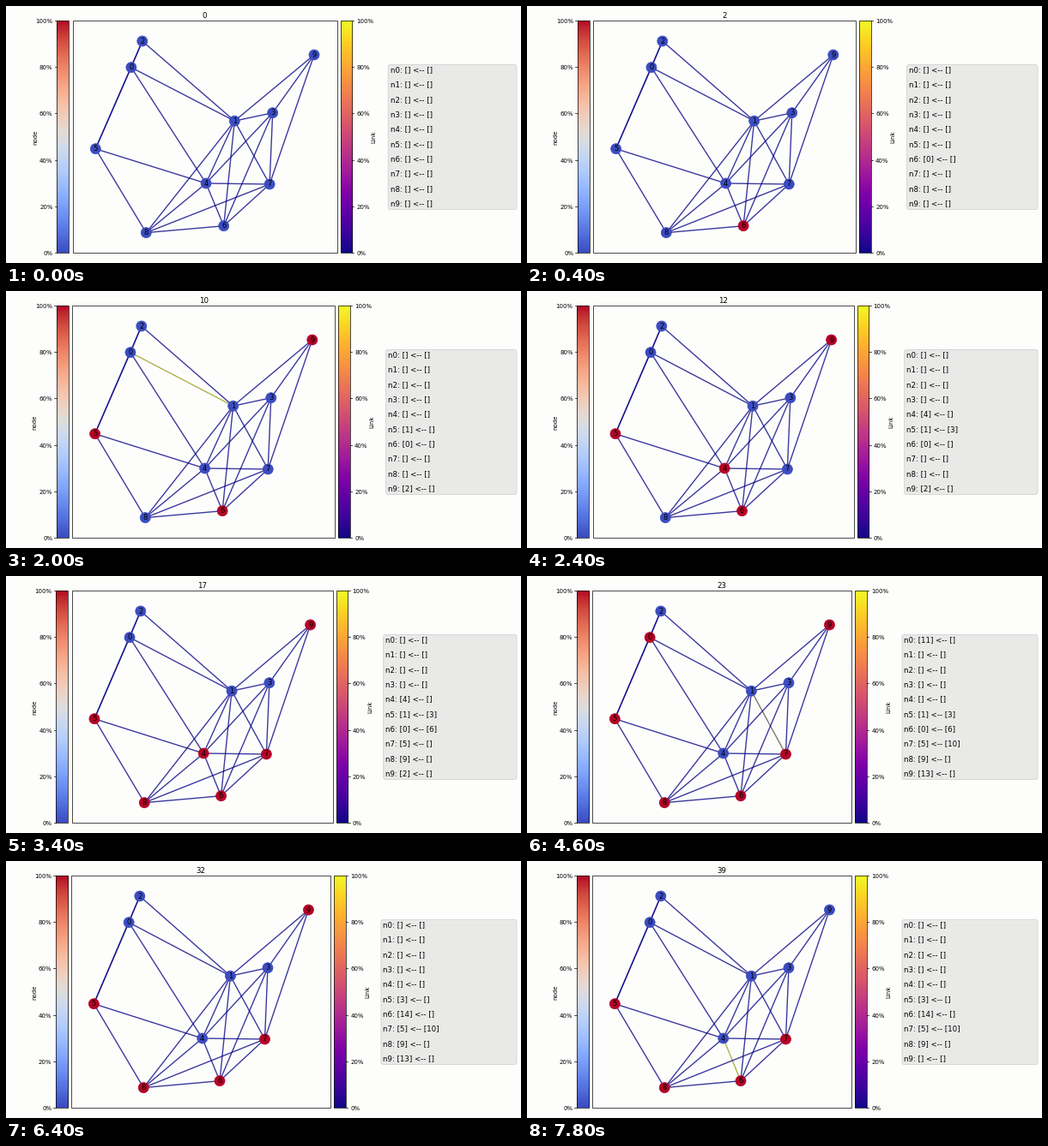
These frames come from a looping animation (600 px wide and 300 px high, 8000 ms). A matplotlib script:

```python
from itertools import combinations

import numpy as np
import matplotlib.pyplot as plt
from matplotlib.animation import FuncAnimation
from matplotlib.patches import FancyBboxPatch, Rectangle

W, H, DPI = 600, 300, 50
FRAMES, STEP_MS = 40, 200
TOP, BOTTOM = 17, 288
PAPER = "#fdfefc"

# node centres: x as a share of the plot width, y in pixels
NODES = np.array([(.222, 71.7), (.613, 134.2), (.264, 41), (.757, 124.7),
                  (.505, 207), (.087, 166.7), (.572, 256.7), (.7455, 208),
                  (.2785, 264.6), (.914, 57)])
# any two nodes within radio range are linked
RANGE, SPREAD = 177, (340, 1)
LINKS = [(a, b) for a, b in combinations(range(len(NODES)), 2)
         if np.hypot(*((NODES[a] - NODES[b]) * SPREAD)) < RANGE]

LONG = 30
# (task id, node, steps of work)
TASKS = [(0, 6, 24), (1, 5, 21), (2, 9, 13), (3, 5, LONG), (4, 4, 8),
         (5, 7, LONG), (6, 6, 3), (9, 8, LONG), (10, 7, LONG), (11, 0, 5),
         (13, 9, 10), (14, 6, LONG)]

# step -> link in use and its load
TRAFFIC = {10: ((0, 1), .69), 14: ((0, 4), .69), 23: ((1, 7), .4),
           38: ((6, 7), .69), 39: ((4, 6), .69)}

PLASMA, COOLWARM = plt.get_cmap("plasma"), plt.get_cmap("coolwarm")
RAMP = np.linspace(0, 1, 256)[:, None]

fig = plt.figure(figsize=(W / DPI, H / DPI), dpi=DPI, facecolor=PAPER)
stage = fig.add_axes([0, 0, 1, 1])


def arrival(task):
    """Step at which a task reaches its node."""
    return round(np.interp(task, [0, 3, 9, 14], [2, 11, 17, 25]))


def node_state(step):
    """Running and waiting task ids of every node, first come first served."""
    running = [[] for _ in NODES]
    waiting = [[] for _ in NODES]
    free_at = [0] * len(NODES)
    for task, node, work in TASKS:
        start = max(arrival(task), free_at[node])
        free_at[node] = start + work
        if start <= step < free_at[node]:
            running[node].append(task)
        elif arrival(task) <= step < start:
            waiting[node].append(task)
    return running, waiting


def outline(x, width):
    stage.add_patch(Rectangle((x, TOP), width, BOTTOM - TOP, fill=False,
                              ec="black", lw=1, zorder=5))


def color_scale(x, width, cmap, label, side):
    """Colour bar with ticks on its left (-1) or right (1) side."""
    stage.imshow(RAMP, cmap=cmap, origin="lower", aspect="auto",
                 extent=(x, x + width, BOTTOM, TOP), interpolation="nearest")
    outline(x, width)
    edge = x + width if side > 0 else x
    align = "left" if side > 0 else "right"
    for y, share in zip(np.linspace(BOTTOM, TOP, 6), range(0, 101, 20)):
        stage.plot([edge, edge + 2.4 * side], [y, y], color="black", lw=1)
        stage.text(edge + 0.5 + 4.9 * side, y + 0.5, f"{share}%", fontsize=10,
                   ha=align, va="center_baseline")
    stage.text(edge + 0.5 + 25.2 * side, (TOP + BOTTOM + 1) / 2, label,
               fontsize=10, rotation=90, ha="center", va="center")


def draw_graph(left, width, step, running):
    xy = NODES * (width, 1) + (left, 0)
    active, load = TRAFFIC.get(step, (None, 0))
    idle, busy = np.array(PLASMA([0.0, 1.0]))
    idle[3] = 0.8
    for link in LINKS:
        color = idle + (busy - idle) * load if link == active else idle
        stage.plot(*xy[list(link)].T, color=tuple(color), lw=2, zorder=2)
    use = [float(bool(tasks)) for tasks in running]
    stage.scatter(*xy.T, s=300, c=COOLWARM(use), linewidths=1, zorder=6)
    for i, (x, y) in enumerate(xy):
        stage.text(x, y, str(i), fontsize=12, ha="center", va="center",
                   zorder=7)


def draw_panel(x, lines):
    stage.add_patch(FancyBboxPatch(
        (x, 68.5), 595 - x, 169, boxstyle="round,pad=0,rounding_size=2.5",
        fc="#e9e9e8", ec="#cccccc", lw=1))
    for i, line in enumerate(lines):
        stage.text(x + 2.4, 77 + 17.33 * i, line, fontsize=12.4)


def draw(step):
    stage.clear()
    stage.axis("off")
    running, waiting = node_state(step)
    lines = [f"n{i}: {r} <-- {w}"
             for i, (r, w) in enumerate(zip(running, waiting))]

    # the plot gives way to the widest line; ", " is as wide as one digit
    extra = max(len(s.replace(", ", ",")) for s in lines) - len("n0: [] <-- []")
    left, right = 77.5 - 0.5 * extra, 385.5 - 2.35 * extra

    color_scale(59 - 0.45 * extra, 14, COOLWARM, "node", -1)
    color_scale(right + 4, 13.5, PLASMA, "Link", 1)
    outline(left, right - left)
    draw_graph(left, right - left, step, running)
    draw_panel(445.2 - 2.75 * extra, lines)
    stage.text((left + right) / 2, 13.8, str(step), fontsize=12.4, ha="center")

    stage.set_xlim(0, W)
    stage.set_ylim(H, 0)
    return []


anim = FuncAnimation(fig, draw, frames=FRAMES, interval=STEP_MS,
                     init_func=lambda: draw(0), repeat=True, repeat_delay=0)
plt.show()
```
